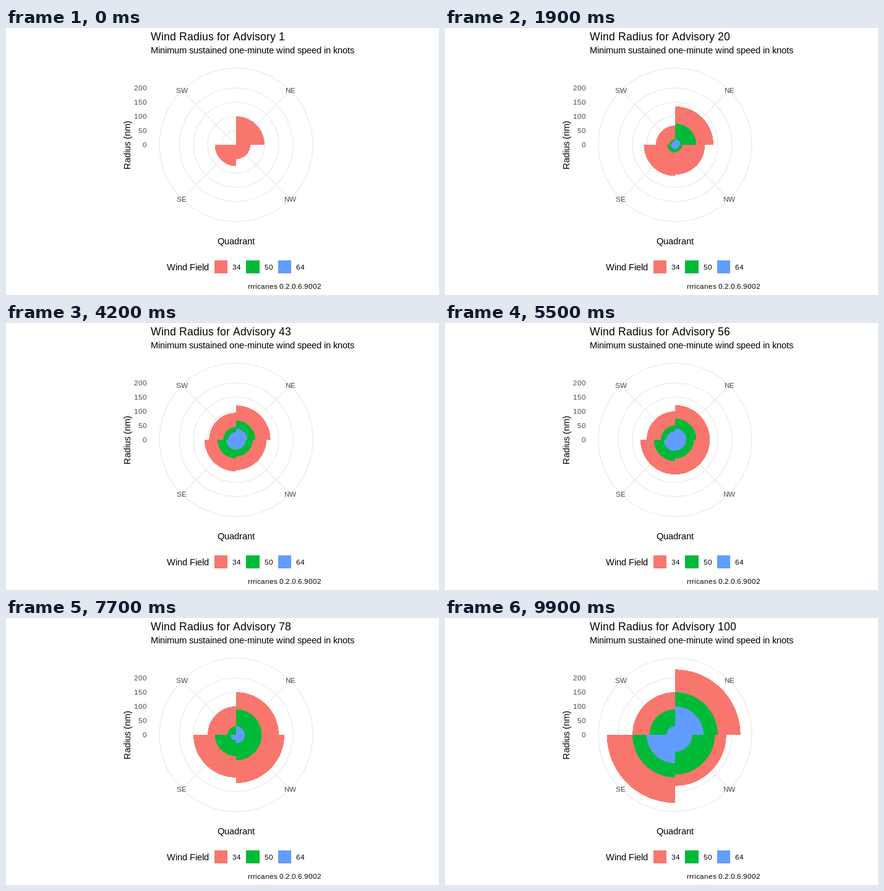
Write an HTML page with a canvas that moves like this. It is 700 by 432 pixels and loops after 10000 ms.

```html
<!DOCTYPE html>
<html lang="en">
<head>
<meta charset="utf-8">
<title>Wind Radius</title>
<style>
html, body { margin: 0; width: 100%; height: 100%; overflow: hidden; background: #fff; }
canvas { display: block; width: 700px; height: 432px; }
</style>
</head>
<body>
<canvas id="stage" width="700" height="432"></canvas>
<script>
const ctx = document.getElementById('stage').getContext('2d');
const CX = 372, CY = 189, OUTER = 124;
const SCALE = OUTER / 0.45 * 0.4 / 240;   // pixels per nautical mile
const STEP = 100, COUNT = 100;
const SMALL = 11.73, MEDIUM = 14.67, LARGE = 17.6;
const GREY = '#4d4d4d';
const COLORS = ['#f8766d', '#00ba38', '#619cff'];

// Key advisories: radii of each wind field, clockwise from the top right.
// Missing values are 0; the storm changes evenly between keys.
const KEYS = [
  { at: 1, fields: [[100, 50, 75]] },
  { at: 11, fields: [[150, 120, 120, 45], [90]] },
  { at: 29, fields: [[120, 90, 100, 90], [60, 50, 55, 40], [40, 30, 30, 25]] },
  { at: 56, fields: [[122, 122, 122, 100], [75, 66, 75, 50], [40, 38, 40, 30]] },
  { at: 78, fields: [[150, 170, 150, 100], [90, 90, 75, 30], [30, 30, 20]] },
  { at: 91, fields: [[180, 165, 150, 120], [130, 105, 80, 75], [75, 55, 25, 20]] },
  { at: 100, fields: [[230, 180, 240, 150], [150, 140, 150, 90], [100, 60, 100, 30]] }
];

function radius(n, field, quad) {
  const next = Math.max(1, KEYS.findIndex(key => key.at >= n));
  const a = KEYS[next - 1], b = KEYS[next];
  const [from, to] = [a, b].map(key => key.fields[field]?.[quad] ?? 0);
  return from + (to - from) * (n - a.at) / (b.at - a.at);
}

// Text set on whole-pixel advances; align is 0 (left) to 1 (right)
function text(str, x, y, size, color = '#000', align = 0) {
  ctx.font = size + 'px "Liberation Sans", Arial, sans-serif';
  ctx.fillStyle = color;
  const chars = [...str];
  const widths = chars.map(c => Math.round(ctx.measureText(c).width));
  x = Math.round(x - align * widths.reduce((sum, w) => sum + w, 0));
  chars.forEach((c, i) => {
    ctx.fillText(c, x, y);
    x += widths[i];
  });
}

// Hard-edged quarter disc, one pixel row at a time
function wedge(quad, r) {
  const right = quad < 2, below = quad === 1 || quad === 2;
  for (let row = 0; row + 0.5 <= r; row++) {
    const w = Math.round(Math.sqrt(r * r - (row + 0.5) ** 2));
    ctx.fillRect(right ? CX : CX - w, below ? CY + row : CY - 1 - row, w, 1);
  }
}

function grid() {
  ctx.strokeStyle = '#ebebeb';
  ctx.lineWidth = 1.42;
  ctx.beginPath();
  const diag = OUTER * Math.SQRT1_2;
  for (const s of [-1, 1]) {
    ctx.moveTo(CX - diag, CY - s * diag);
    ctx.lineTo(CX + diag, CY + s * diag);
  }
  for (let i = 1; i <= 5; i++) {
    const r = i < 5 ? i * 50 * SCALE : OUTER;
    ctx.moveTo(CX + r, CY);
    ctx.arc(CX, CY, r, 0, Math.PI * 2);
  }
  ctx.stroke();
}

function labels(n) {
  text('Wind Radius for Advisory ' + n, 234, 20, LARGE);
  text('Minimum sustained one-minute wind speed in knots', 234, 41, MEDIUM);
  for (let v = 0; v <= 200; v += 50) {
    text(String(v), 228, Math.round(CY - v * SCALE) + 4, SMALL, GREY, 1);
  }
  const off = OUTER * Math.SQRT1_2;
  ['SW', 'NE', 'SE', 'NW'].forEach((name, i) => {
    const x = i % 2 ? CX + off : CX - off;
    const y = i < 2 ? CY - off : CY + off;
    text(name, x, Math.round(y + 4), SMALL, GREY, 0.5);
  });
  text('Quadrant', CX, 350, MEDIUM, '#000', 0.5);

  ctx.save();
  ctx.translate(201, 229);
  ctx.rotate(-Math.PI / 2);
  text('Radius (nm)', 0, 0, MEDIUM);
  ctx.restore();

  text('Wind Field', 260, 392, MEDIUM);
  ['34', '50', '64'].forEach((name, i) => {
    const x = 337 + i * 51.5;
    ctx.fillStyle = COLORS[i];
    ctx.fillRect(Math.floor(x), 376, Math.ceil(x + 21) - Math.floor(x), 21);
    text(name, x + 29, 391, SMALL);
  });
  text('rrricanes 0.2.0.6.9002', 391, 422, SMALL);
}

function draw(n) {
  ctx.fillStyle = '#fff';
  ctx.fillRect(0, 0, 700, 432);
  grid();
  COLORS.forEach((color, field) => {
    ctx.fillStyle = color;
    for (let quad = 0; quad < 4; quad++) wedge(quad, radius(n, field, quad) * SCALE);
  });
  labels(n);
}

const start = performance.now();
let shown = 0;
function tick() {
  const t = Math.max(0, performance.now() - start);
  const n = Math.floor(t / STEP) % COUNT + 1;
  if (n !== shown) draw(shown = n);
  requestAnimationFrame(tick);
}
tick();
</script>
</body>
</html>
```
